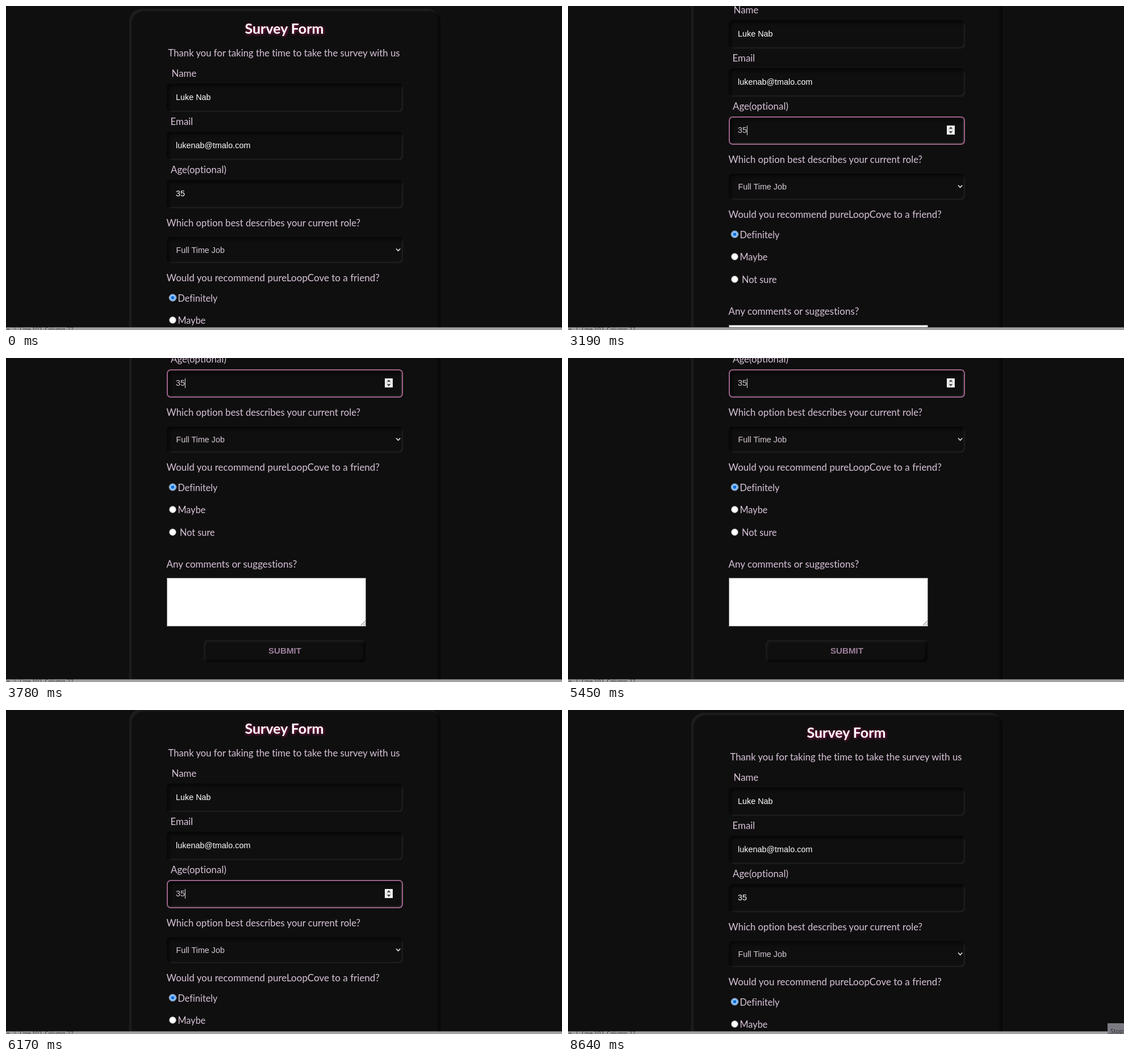
These frames come from a looping animation (979x572 px, 8680 ms). An HTML page:

```html
<!DOCTYPE html>
<html lang="en">
<head>
<meta charset="utf-8">
<title>Survey Form</title>
<style>
  html, body { margin: 0; width: 100%; height: 100%; overflow: hidden; background: #0f0f0f; }
  #stage { position: relative; width: 979px; height: 572px; overflow: hidden; background: #0f0f0f; }
  #page, #page svg { position: absolute; left: 0; top: 0; width: 979px; height: 1000px; }
  #page div, #bar, #stop { position: absolute; box-sizing: border-box; }
  .card { left: 217px; top: 5px; width: 548px; height: 1000px; border-radius: 22px;
    box-shadow: inset 4px 4px 3px #1f1f1f, inset -4px -4px 4px #080808; }
  .field { left: 283px; width: 416px; height: 50px; border-radius: 7px;
    box-shadow: inset 4px 4px 5px #070707, inset -2px -2px 2px #222; }
  .focus #age { border: 2px solid #9c6289; }
  .area { left: 283px; top: 675px; width: 351px; height: 86px; background: #fff; border: 1px solid #767676; }
  .submit { left: 348px; top: 785px; width: 285px; height: 39px; border-radius: 7px;
    box-shadow: inset 3px 3px 3px #1d1d1d, inset -3px -3px 4px #060606; }
  text { font: 17px Lato, sans-serif; font-variant-ligatures: none; fill: #d8c3d8; white-space: pre; }
  .title { font-size: 25px; font-weight: 700; fill: #fff; text-anchor: middle;
    text-shadow: 1px 1px 5px #b01c60; }
  .label { font-size: 16.9px; }
  .ask { font-size: 16.7px; }
  .radio { font-size: 16.3px; }
  .value { font: 14.4px "Liberation Sans", Arial, sans-serif; fill: #fff; }
  .soft, .focus #years { fill: #d6cad6; }
  .button { font: 700 15.2px "Liberation Sans", Arial, sans-serif; fill: #9c7f9a; text-anchor: middle; }
  #spin, #caret { visibility: hidden; }
  .focus #spin, .focus.blink #caret { visibility: visible; }
  #bar { left: 0; top: 567px; width: 979px; height: 5px; background: #a2a2a2; border-top: 1px solid #6f6f6f; }
  #bar span, #stop span { position: absolute; white-space: pre; color: #3c3c3c;
    font: 10px/14px "Open Sans", sans-serif; }
  #bar span { top: -4px; }
  #stop { left: 950px; top: 553px; width: 29px; height: 19px; background: #7b7a82; overflow: hidden; }
  #stop span { left: 5px; top: 7px; font-size: 11px; color: #2c2c30; }
</style>
</head>
<body>
<div id="stage">
  <div id="page">
    <div class="card"></div>
    <div class="field" style="top:137px"></div>
    <div class="field" style="top:222px"></div>
    <div class="field" style="top:307px" id="age"></div>
    <div class="field" style="top:408px;height:46px"></div>
    <div class="area"></div>
    <div class="submit"></div>
    <svg id="ink" viewBox="0 0 979 1000">
      <path d="M687 428.5l3.6 3.8 3.6-3.8" fill="none" stroke="#e4e0e4" stroke-width="1.7"/>
      <path d="M625 759l8-8M629.5 759l3.5-3.5" stroke="#555" stroke-width="1"/>
      <g id="spin">
        <rect x="667" y="323" width="14" height="16" fill="#f0f0f0"/>
        <path d="M667 331h14" stroke="#d0d0d0"/>
        <path d="M670.5 329l3.5-4 3.5 4zM670.5 333l3.5 4 3.5-4z" fill="#504a4e"/>
      </g>
      <rect id="caret" x="315" y="323" width="1" height="17" fill="#e2dae2"/>
    </svg>
  </div>
  <div id="bar"><span style="left:1px">≡</span><span style="left:13px">|</span><span style="left:24px">Line 102, Column 27</span></div>
  <div id="stop"><span>Stop</span></div>
</div>
<script>
const LOOP = 8680;
const $ = id => document.getElementById(id);

function add(tag, attrs, text = "") {
  const el = document.createElementNS("http://www.w3.org/2000/svg", tag);
  for (const key in attrs) el.setAttribute(key, attrs[key]);
  el.textContent = text;
  $("ink").append(el);
}

// x, baseline, class, text, id
const lines = [
  [490, 48.5, "title", "Survey Form"],
  [285.5, 89, "ask", "Thank you for taking the time to take the survey with us"],
  [291.5, 125, "label", "Name"],
  [299, 166, "value", "Luke Nab"],
  [289.5, 210, "label", "Email"],
  [299, 251, "value", "lukenab@tmalo.com"],
  [290, 295, "label", "Age(optional)"],
  [299, 336, "value", "35", "years"],
  [282.5, 389, "ask", "Which option best describes your current role?"],
  [299.5, 435.5, "value soft", "Full Time Job"],
  [282.5, 486, "", "Would you recommend pureLoopCove to a friend?"],
  [302.5, 521.5, "radio", "Definitely"],
  [302.5, 561, "radio", "Maybe"],
  [306, 600.5, "radio", "Not sure"],
  [282.5, 657, "", "Any comments or suggestions?"],
  [491, 809, "button", "SUBMIT"]
];
for (const [x, y, cls, text, id = ""] of lines) {
  add("text", id ? { x, y, id, class: cls } : { x, y, class: cls }, text);
}

[515, 554.5, 594.5].forEach((cy, i) => {
  const on = i === 0;
  add("circle", { cx: 293.5, cy, r: 6, fill: "#fff", stroke: on ? "#fff" : "#767676" });
  if (on) {
    add("circle", { cx: 293.5, cy, r: 5.1, fill: "none", stroke: "#0a6fd8", "stroke-width": 1.1 });
    add("circle", { cx: 293.5, cy, r: 3.3, fill: "#0a6fd8" });
  }
});

// [time, scroll offset], each held until the next
const scroll = [
  [0, 0], [2870, 22], [2940, 76], [3010, 97],
  [3190, 112], [3260, 158], [3320, 184], [3380, 191], [3440, 193],
  [3510, 212], [3580, 256], [3640, 279], [3710, 286], [3780, 287],
  [5540, 268], [5610, 216], [5680, 193], [5750, 178], [5820, 122], [5890, 97],
  [5960, 82], [6030, 47], [6100, 21], [6170, 7], [6230, 2], [6300, 0]
];
const focus = [[0, 0], [2670, 1], [8490, 0]];
const caret = [[0, 1], [7490, 0], [8020, 1]];
const stop = [[0, 0], [8490, .5], [8640, 1]];

const at = (steps, t) => steps.findLast(s => s[0] <= t)[1];

function draw() {
  const t = performance.now() % LOOP;
  $("page").style.transform = `translateY(${-at(scroll, t)}px)`;
  $("page").classList.toggle("focus", at(focus, t) === 1);
  $("page").classList.toggle("blink", at(caret, t) === 1);
  $("stop").style.opacity = at(stop, t);
  requestAnimationFrame(draw);
}
draw();
</script>
</body>
</html>
```
